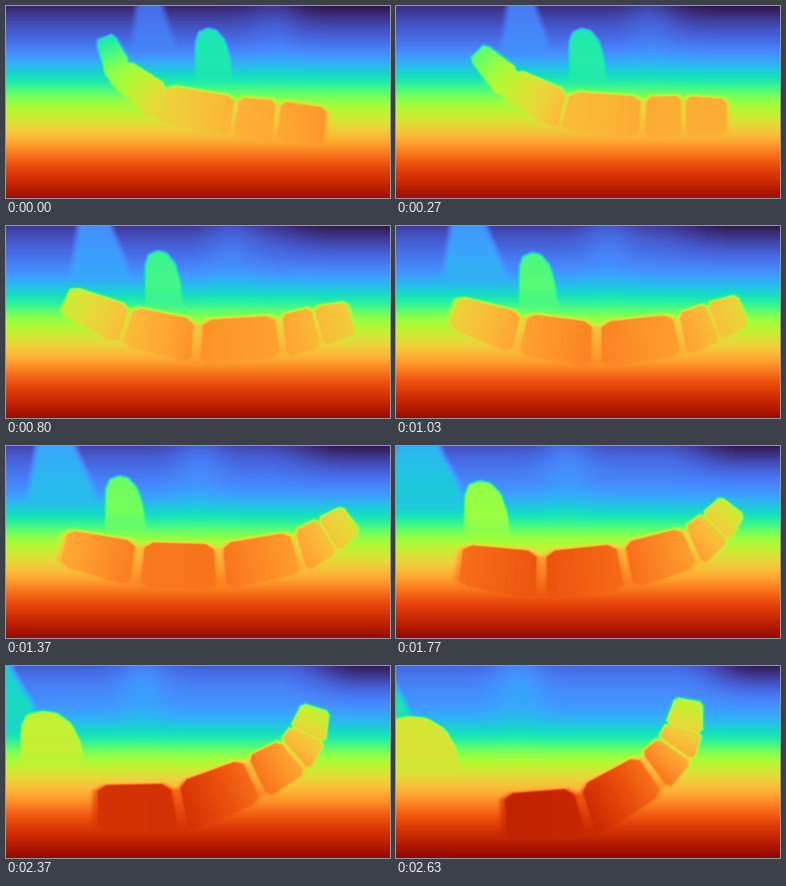
A matplotlib script that plays this animation: 384 px wide and 192 px high, repeating every 2.66 s.

```python
import numpy as np
import matplotlib.pyplot as plt
from matplotlib.animation import FuncAnimation

W, H = 384, 192
FRAMES, LOOP_MS = 80, 2660
X, Y = np.meshgrid(np.arange(W) + 0.5, np.arange(H) + 0.5)

# Joints of the five-car chain when the swing begins, is halfway and ends
FIRST = np.array([(99, 32), (112, 64), (153, 96), (228, 111), (270, 115), (322, 121)])
HALF = np.array([(53, 98), (130, 117), (212, 121), (293, 106), (322, 90), (346, 74)])
LAST = np.array([(105, 152), (189, 148), (258, 106), (280, 83), (288, 62), (293, 34)])


def smooth(a, b, v):
    u = np.clip((v - a) / (b - a), 0, 1)
    return u * u * (3 - 2 * u)


def bell(v, centre, width):
    return np.exp(-((v - centre) / width) ** 2)


def round_corners(pts, cut=0.12):
    nxt = np.roll(pts, -1, axis=0)
    ends = [pts + (nxt - pts) * cut, pts + (nxt - pts) * (1 - cut)]
    return np.stack(ends, axis=1).reshape(-1, 2)


def distance(pts, x, y):
    """Signed distance to a polygon, negative inside."""
    best = np.full(x.shape, 1e9)
    inside = np.zeros(x.shape, bool)
    for (ax, ay), (bx, by) in zip(pts, np.roll(pts, -1, axis=0)):
        ex, ey = bx - ax, by - ay
        u = ((x - ax) * ex + (y - ay) * ey) / (ex * ex + ey * ey + 1e-9)
        u = np.clip(u, 0, 1)
        best = np.minimum(best, (x - ax - u * ex) ** 2 + (y - ay - u * ey) ** 2)
        if abs(ey) > 1e-9:
            cross = (ay <= y) != (by <= y)
            inside ^= cross & (x < ax + (y - ay) * ex / ey)
    return np.where(inside, -1, 1) * np.sqrt(best)


def paint(depth, pts, value, soft=1.6, weight=1.0, fade=None):
    """Bring a polygon forward to value(x, y); fade = rows where it dissolves."""
    pts = round_corners(np.asarray(pts, float))
    margin = 8
    x0, y0 = np.clip(np.floor(pts.min(0) - margin), 0, (W, H)).astype(int)
    x1, y1 = np.clip(np.ceil(pts.max(0) + margin), 0, (W, H)).astype(int)
    if x0 >= x1 or y0 >= y1:
        return
    box = np.s_[y0:y1, x0:x1]
    x, y = X[box], Y[box]
    mask = weight * smooth(soft, -soft, distance(pts, x, y))
    if fade:
        mask = mask * (1 - smooth(*fade, y))
    depth[box] += mask * np.maximum(value(x, y) - depth[box], 0)


def ground(t):
    top = 0.04 + 0.09 * t
    depth = top + (0.95 + 0.02 * t - top) * Y / H
    depth -= (0.085 + 0.035 * t) * bell(Y, 48 + 5 * t, 36)
    depth += 0.02 * bell(Y, 158, 30)
    # Dark far corner and a lighter column that drifts left
    corner = smooth(230 + 50 * t, 320 + 40 * t, X)
    depth -= (0.02 + 0.08 * t) * corner * bell(Y, 0, 28)
    depth += (0.03 + 0.02 * t) * bell(X, 270 - 148 * t, 25) * bell(Y, 0, 50)
    return depth


def paint_cone(depth, t):
    cx, w = 145 - 180 * t, 20 + 18 * t
    near = 0.15 + 0.17 * t
    pts = [(cx - .6 * w, -25), (cx + .3 * w, -25), (cx + .7 * w, 8),
           (cx + 1.2 * w, 38), (cx + 1.5 * w, 80), (cx - 1.2 * w, 80),
           (cx - .9 * w, 30)]
    paint(depth, pts, lambda x, y: near + 0.0008 * (y - 25), soft=5,
          fade=(40, 80))


def paint_tree(depth, t):
    cx = 207 - 157 * t - 26 * t * t
    top = 22 + 28 * t * t
    w = 18 + 18 * t ** 4
    near = 0.34 + 0.24 * t ** 1.3
    pts = [(cx - w, top + 75), (cx - w, top + 15), (cx - .8 * w, top + 4),
           (cx - .3 * w, top), (cx + .2 * w, top + 2), (cx + .7 * w, top + 13),
           (cx + w, top + 32), (cx + 1.2 * w, top + 75)]
    paint(depth, pts, lambda x, y: near + 0.0004 * (y - top - 15), soft=2.2,
          fade=(top + 32, top + 75))


def chain(t):
    """Joints, their half-height vectors and depths at time t in 0..1."""
    joints = (FIRST * (1 - t) * (1 - 2 * t) + HALF * 4 * t * (1 - t)
              + LAST * t * (2 * t - 1))
    y = joints[:, 1]
    near = 0.20 + 0.0043 * y + t * (0.22 - 0.0011 * y)
    along = np.gradient(joints, axis=0)
    along /= np.linalg.norm(along, axis=1, keepdims=True)
    half = 1 + 29 * near
    half[[0, -1]] *= 0.87
    up = np.column_stack([along[:, 1], -along[:, 0]]) * half[:, None]
    return joints, up, near


def paint_chain(depth, t):
    joints, up, near = chain(t)

    def car(k, inset, **style):
        a, b = joints[k], joints[k + 1]
        axis = b - a

        def at(u, side):
            return a + axis * u + side * (up[k] + (up[k + 1] - up[k]) * u)

        def value(x, y):
            u = ((x - a[0]) * axis[0] + (y - a[1]) * axis[1]) / (axis @ axis)
            return near[k] + (near[k + 1] - near[k]) * np.clip(u, 0, 1)

        u0, u1 = inset, 1 - inset
        paint(depth, [at(u0, 1), at(u1, 1), at(u1, -1), at(u0, -1)],
              value, **style)

    cars = range(len(joints) - 1)
    # A soft band joins the cars; nearer cars stand further apart
    for k in cars:
        car(k, 0, soft=4, weight=0.6)
    for k in cars:
        gap = 0.6 * ((near[k] + near[k + 1]) / 2 - 0.6)
        car(k, np.clip(gap, -0.03, 0.06))


def scene(i):
    t = i / (FRAMES - 1)
    depth = ground(t)
    paint_cone(depth, t)
    paint_tree(depth, t)
    paint_chain(depth, t)
    return np.clip(depth, 0, 1)


fig = plt.figure(figsize=(W / 100, H / 100), dpi=100)
ax = fig.add_axes([0, 0, 1, 1])
ax.axis("off")
image = ax.imshow(scene(0), cmap="turbo", vmin=0, vmax=1,
                  interpolation="nearest", aspect="auto")


def update(i):
    image.set_data(scene(i))
    return [image]


anim = FuncAnimation(fig, update, frames=FRAMES, interval=LOOP_MS / FRAMES,
                     repeat=True, repeat_delay=0, blit=False)
plt.show()
```
